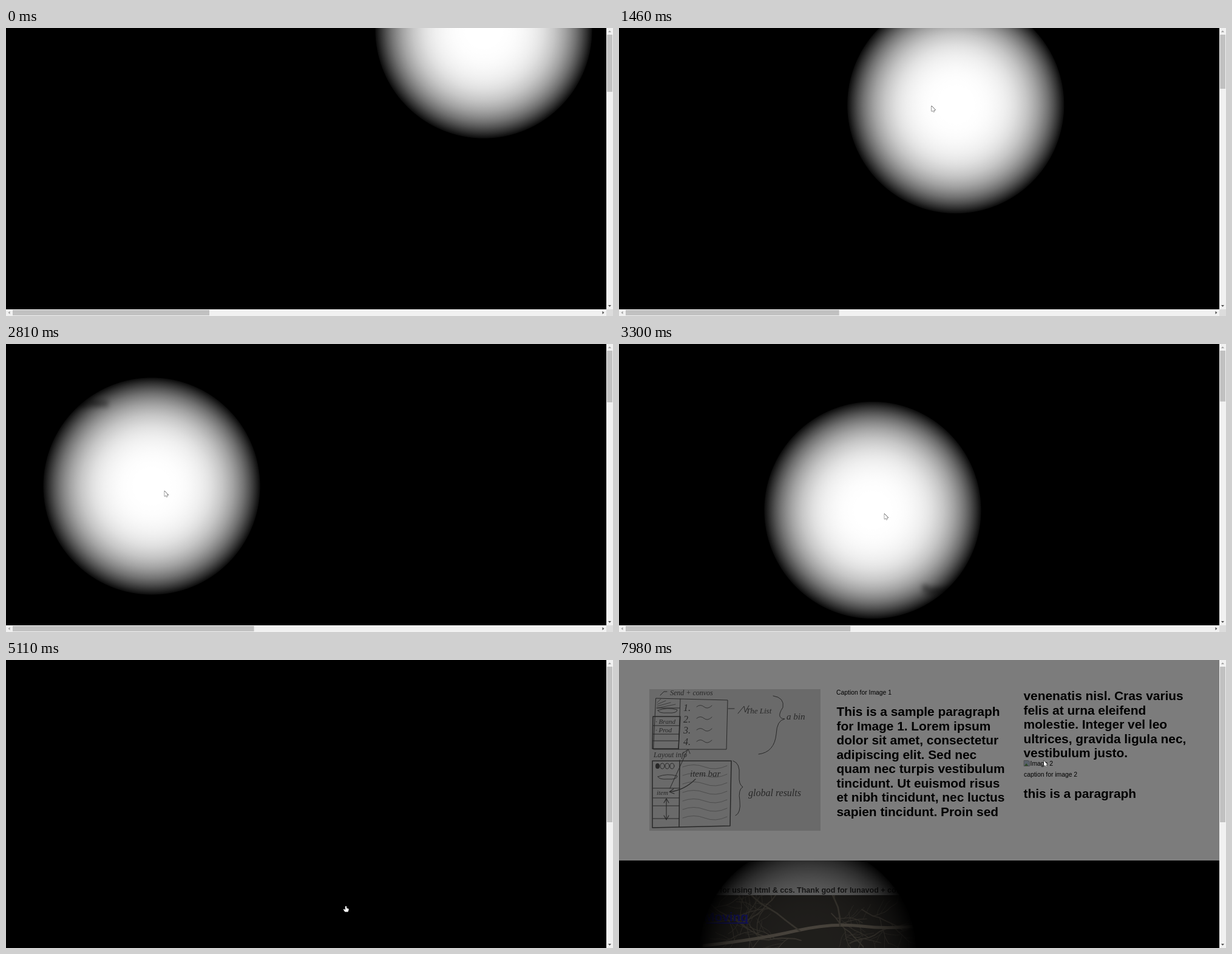
These frames come from a looping animation (1000 px wide and 474 px high, 8000 ms). An HTML page with a canvas:

```html
<!DOCTYPE html>
<html lang="en">
<head>
<meta charset="utf-8">
<title>Spotlight page</title>
<style>
html, body { margin: 0; width: 100%; height: 100%; overflow: hidden; background: #000; }
canvas { display: block; width: 1000px; height: 474px; }
</style>
</head>
<body>
<canvas id="stage" width="1000" height="474"></canvas>
<script>
const ctx = document.getElementById('stage').getContext('2d');
const LOOP = 8000, START = 890, NAV = 5110, TICK = 96;
const R = 179, LEAD = 60, FOLD = 330;
const SANS = '"Liberation Sans", Arial, sans-serif';

// Spotlight on the first page: time, x, y
const SPOT = [
  [0, 787, 3], [START, 770, 6], [1460, 558, 126], [1850, 255, 100], [2270, 162, 112],
  [2520, 150, 150], [2810, 240, 234], [3400, 452, 286], [3970, 566, 398], [4800, 561, 404]
];

// The picture is redrawn about ten times a second
function snap(t) {
  const base = t < NAV ? START : NAV;
  return Math.max(0, base + Math.floor((t - base) / TICK + 0.1) * TICK);
}

// Smooth curve through timed points
function along(keys, t) {
  const last = keys.length - 1;
  if (t >= keys[last][0]) return keys[last].slice(1);
  let i = 0;
  while (keys[i + 1][0] <= t) i++;
  const a = keys[i], b = keys[i + 1], span = b[0] - a[0], u = (t - a[0]) / span;
  const slope = (j, k) => {
    const p = keys[Math.max(0, j - 1)], q = keys[Math.min(last, j + 1)];
    return (q[k] - p[k]) / (q[0] - p[0]) * span;
  };
  return [1, 2].map(k =>
    (2 * u ** 3 - 3 * u * u + 1) * a[k] + (u ** 3 - 2 * u * u + u) * slope(i, k) +
    (3 * u * u - 2 * u ** 3) * b[k] + (u ** 3 - u * u) * slope(i + 1, k));
}

function seeded(seed) {
  return () => (seed = seed * 16807 % 2147483647) / 2147483647;
}

function rect(x, y, w, h, color) {
  ctx.fillStyle = color;
  ctx.fillRect(x, y, w, h);
}

function label(str, x, y, font, color = '#000', align = 'left') {
  ctx.font = font + ' ' + SANS;
  ctx.textAlign = align;
  ctx.fillStyle = color;
  ctx.fillText(str, x, y);
}

function stroke(d, width, color) {
  ctx.lineWidth = width;
  ctx.strokeStyle = color;
  ctx.stroke(new Path2D(d));
}

// Darkness with a soft round hole
function veil(cx, cy, top, height) {
  const g = ctx.createRadialGradient(cx, cy, 0, cx, cy, R);
  for (let r = 0; r < 1; r += 0.05) g.addColorStop(r, `rgba(0,0,0,${0.97 * r ** 3.4})`);
  g.addColorStop(0.995, 'rgba(0,0,0,.95)');
  g.addColorStop(1, '#000');
  rect(0, top, 989, height, g);
}

function arrow(x, y, dx, dy, color) {
  ctx.fillStyle = color;
  ctx.beginPath();
  ctx.moveTo(x + dx * 2, y + dy * 2);
  ctx.lineTo(x - dx + dy * 2.5, y - dy + dx * 2.5);
  ctx.lineTo(x - dx - dy * 2.5, y - dy - dx * 2.5);
  ctx.fill();
}

function verticalBar(height, thumb) {
  rect(989, 0, 11, 474, '#f1f1f1');
  rect(990, 11, 9, thumb, '#c1c1c1');
  arrow(994.5, 6, 0, -1, '#a3a3a3');
  arrow(994.5, height - 6, 0, 1, '#505050');
}

function horizontalBar(thumb) {
  rect(0, 463, 989, 11, '#f1f1f1');
  rect(989, 463, 11, 11, '#dcdcdc');
  rect(11, 464, thumb, 9, '#c1c1c1');
  arrow(5.5, 468.5, -1, 0, '#a3a3a3');
  arrow(983.5, 468.5, 1, 0, '#505050');
}

const ARROW = new Path2D('M0 0V8.6L2 6.9L3.3 9.6L4.7 9L3.5 6.3H6Z');
const HAND = new Path2D('M-1 .6Q0-.6 1 .6V3.6L4 4.3Q4.9 4.8 4.5 6.5L3.4 9.6H-1.6L-4 6Q-4.3 4.8-3 5L-1 6.3Z');

function pointer(x, y, hand) {
  const shape = hand ? HAND : ARROW;
  ctx.save();
  ctx.translate(x, y);
  ctx.fillStyle = '#fff';
  ctx.strokeStyle = '#222';
  ctx.lineWidth = .9;
  ctx.stroke(shape);
  ctx.fill(shape);
  ctx.restore();
}

function firstPage(t) {
  const [x, y] = along(SPOT, t);
  rect(0, 0, 1000, 474, '#fff');
  ctx.filter = 'blur(4px)';
  label('Sketches', 168, 103, 'bold 18px', 'rgba(0,0,0,.8)', 'right');
  label('Typography', 499, 411, 'bold 18px', 'rgba(0,0,0,.9)');
  ctx.filter = 'none';
  veil(x, y, 0, 463);
  // The light's box widens the scrollable area
  verticalBar(463, 441 * 463 / (y + 2168));
  horizontalBar(968 * 989 / (x + 2168));
  if (t >= START) {
    const [px, py] = along(SPOT, t + LEAD);
    pointer(px, py, py > 394 && px > 498);
  }
}

const INK = '#525252';

function note(str, x, y, size) {
  ctx.font = `italic ${size}px "Liberation Serif", serif`;
  ctx.textAlign = 'left';
  ctx.fillStyle = INK;
  ctx.fillText(str, x, y);
}

// Photo of a pencil wireframe: two windows with side menus
function drawing() {
  rect(50, 48, 282, 233, '#dadada');
  stroke('M61 63L179 66L177 147L57 147ZM101 64L98 147M62 79H100M68 58L74 52H79', 1, INK);
  stroke('M56 93H101L98 146H55ZM55 166H185L183 273L55 276ZM100 165L99 275', 1.5, INK);
  stroke('M56 108H100M56 122H99M56 133H99M56 211H100M56 227H99M56 240H99M56 261H99', 1.1, INK);
  stroke('M78 229V262M74 235L78 228L82 235M74 256L78 263L82 256M126 196Q108 214 84 217M90 212L83 217L91 220', 1.1, INK);
  stroke('M84 211L113 148M106 153L114 147L117 154M180 80H190M196 88L206 76L208 86L214 75', 1, INK);
  stroke('M254 59Q273 62 270 78Q258 96 273 97Q260 99 259 122Q256 152 230 155', 1, INK);
  stroke('M188 166Q200 170 198 190Q197 205 204 209Q196 213 199 232Q201 252 192 256', 1, INK);
  for (const y of [83, 192]) stroke(`M64 ${y}q16 -6 32 -1q0 6 -16 5q-14 1 -16 -4`, .9, INK);
  for (let i = 0; i < 4; i++) {
    note(i + 1 + '.', 106, 84 + i * 18.5, 16);
    stroke(`M128 ${77 + i * 19}q6 -5 12 0t13 -2`, .8, INK);
    stroke(`M63 ${70 + i * 3}l${6 + i * 8} -6`, .7, INK);
    ctx.beginPath();
    ctx.ellipse(63.5 + i * 8, 174.5, 3.5, 4.5, 0, 0, 7);
    ctx.lineWidth = 1;
    ctx.strokeStyle = ctx.fillStyle = INK;
    i ? ctx.stroke() : ctx.fill();
  }
  for (let y = 176; y < 268; y += 14) stroke(`M105 ${y}q18 -7 36 0t37 -2`, .6, '#777');
  note('Send + convos', 84, 58, 12);
  note('The List', 209, 88, 13);
  note('a bin', 276, 98, 15);
  note('· Brand', 60, 105, 11);
  note('· Prod', 60, 119, 11);
  note('Layout info', 57, 160, 12);
  note('item bar', 117, 192, 15);
  note('item', 62, 222, 11);
  note('global results', 213, 224, 16);
}

const COL_A = ['This is a sample paragraph', 'for Image 1. Lorem ipsum', 'dolor sit amet, consectetur',
  'adipiscing elit. Sed nec', 'quam nec turpis vestibulum', 'tincidunt. Ut euismod risus',
  'et nibh tincidunt, nec luctus', 'sapien tincidunt. Proin sed'];
const COL_B = ['venenatis nisl. Cras varius', 'felis at urna eleifend', 'molestie. Integer vel leo',
  'ultrices, gravida ligula nec,', 'vestibulum justo.'];
const BIG = 'bold 20.86px', SMALL = '10.36px', LINE = 23.5;

function article() {
  rect(0, 0, 989, FOLD, '#fff');
  drawing();
  label('Caption for Image 1', 358, 57, SMALL);
  COL_A.forEach((s, i) => label(s, 358.5, 92 + i * LINE, BIG));
  COL_B.forEach((s, i) => label(s, 666.5, 66 + i * LINE, BIG));
  // Missing picture icon with its alt text
  rect(667.5, 165.5, 9, 9, '#b9c8dc');
  stroke('M667.5 165.5H674L676.5 168V174.5H667.5Z', .8, '#888');
  ctx.fillStyle = '#5c9a4c';
  ctx.fill(new Path2D('M668 174L671 170L674 174Z'));
  label('Image 2', 677.5, 174, SMALL);
  label('caption for image 2', 667, 192, SMALL);
  label('this is a paragraph', 666.5, 227, BIG);
}

// One limb, with smaller ones growing from it
function limb(x, y, angle, width, rnd) {
  for (let i = 0; i < 7; i++) {
    const nx = x + Math.cos(angle) * width * 6, ny = y + Math.sin(angle) * width * 6;
    stroke(`M${x} ${y}L${nx} ${ny}`, width, width > 3 ? '#93897a' : '#716a5e');
    x = nx;
    y = ny;
    angle += (rnd() - .5) * .5;
    if (width > 1 && rnd() < .5) limb(x, y, angle + (rnd() < .5 ? -1 : 1) * (.5 + rnd() * .5), width * .6, rnd);
  }
}

function branches() {
  const rnd = seeded(77);
  ctx.save();
  ctx.beginPath();
  ctx.rect(0, 387, 989, 87);
  ctx.clip();
  rect(0, 387, 989, 87, '#403d38');
  for (let x = 150; x < 480; x += 50) limb(x, 400 + rnd() * 70, rnd() * 6.3, 1.8, rnd);
  stroke('M140 470Q230 460 290 446T400 438T500 436', 5, '#93897a');
  limb(364, 438, -1.6, 2.6, rnd);
  limb(298, 446, -2.5, 2.6, rnd);
  ctx.restore();
}

function secondPage(t) {
  const u = Math.min(1, (t - NAV) / (7980 - NAV));
  const x = 560 + 140 * u ** 10, y = 405 - 239 * u ** 4;
  article();
  rect(0, FOLD, 989, 144, '#d6d6d6');
  label('for using html & ccs. Thank god for lunavod + coffee', 166, 383, 'bold 12.5px', '#333');
  branches();
  label('Moving', 213, 430, BIG, '#2a2ad0', 'right');
  rect(143, 432, 70, 2, '#2a2ad0');
  veil(x - 389, y + 316, FOLD, 144);
  rect(0, 0, 989, 474, `rgba(0,0,0,${1 - .487 * u})`);
  verticalBar(474, 256);
  pointer(x, y, u < .25);
}

function frame(now) {
  const t = snap(now % LOOP);
  ctx.lineCap = ctx.lineJoin = 'round';
  t < NAV ? firstPage(t) : secondPage(t);
  requestAnimationFrame(frame);
}
requestAnimationFrame(frame);
</script>
</body>
</html>
```
